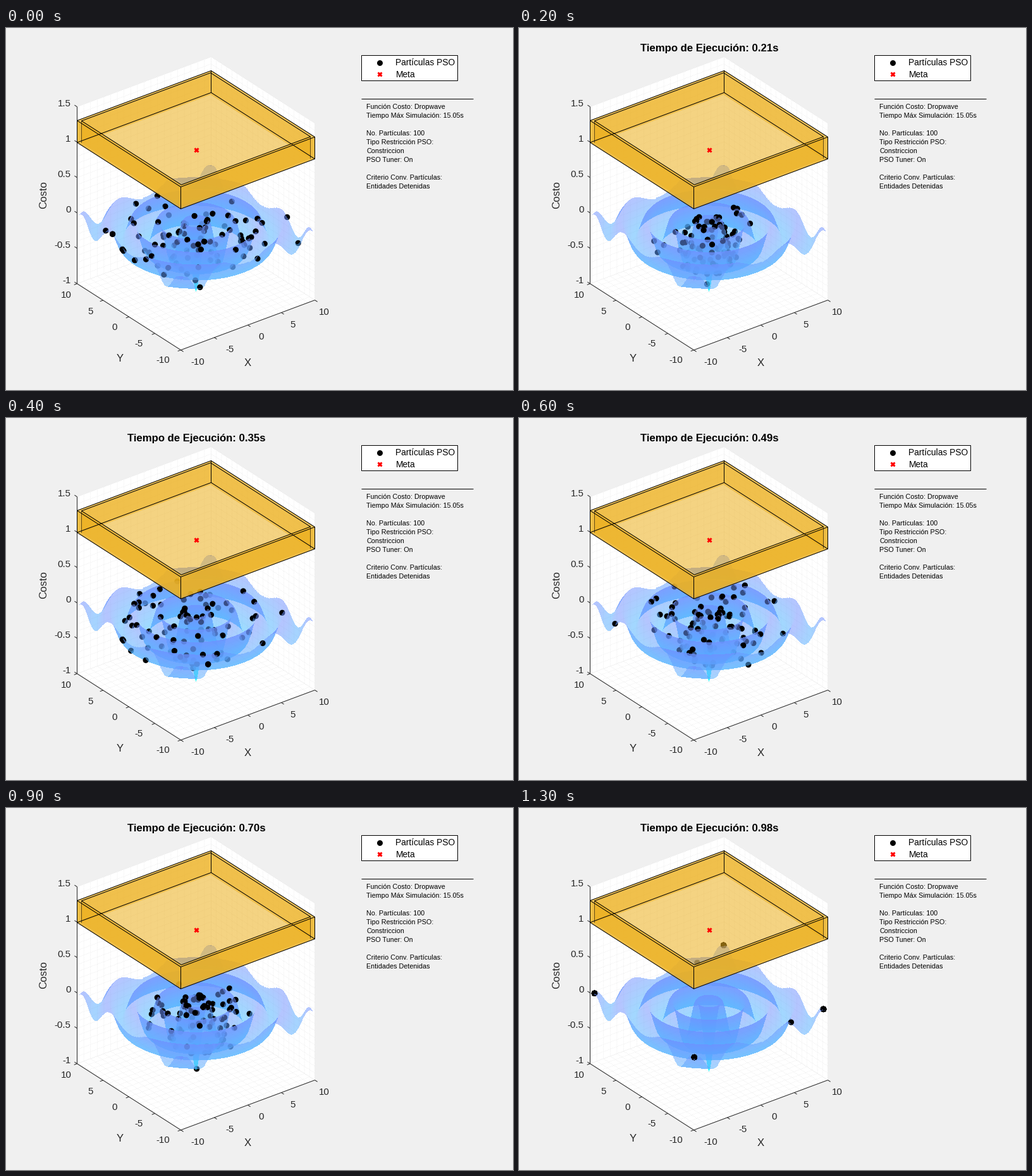
Recreate the animation shown at these times as a matplotlib script. Size 802 px wide and 573 px high, loop 1.4 s.

```python
import numpy as np
import matplotlib.pyplot as plt
from matplotlib.animation import FuncAnimation
from matplotlib.collections import LineCollection
from matplotlib.patches import Polygon, Rectangle

W, H, DPI = 802, 573, 64
PT = 72 / DPI                 # points per pixel
FRAMES, STEP_MS = 14, 100
INK = "#262626"
GOLD = (0.929, 0.694, 0.125)
WALL = 9.63                   # inner side of the box, where particles stop

plt.rcParams["font.family"] = "Liberation Sans"
fig = plt.figure(figsize=(W / DPI, H / DPI), dpi=DPI, facecolor="#f0f0f0")
ax = fig.add_axes([0, 0, 1, 1])
ax.set(xlim=(-0.5, W - 0.5), ylim=(H - 0.5, -0.5))   # whole numbers are pixel centres
ax.axis("off")


def project(x, y, z):
    return np.stack([300 + 10.6 * x - 8.2 * y,
                     305.2 - 3.95 * x - 5.25 * y - 112 * z], axis=-1)


def cost(x, y):
    r = np.hypot(x, y)
    return -(1 + np.cos(2.09 * r)) / (0.5 * r + 2)


def path3(points):
    return project(*np.array(points, float).T)


def label(x, y, text, size, ha="center", **kw):
    return ax.text(x, y + 0.36 * size, text, size=size * PT, ha=ha,
                   va="baseline", **kw)


def segments(lines, color, width=1, **kw):
    ax.add_collection(LineCollection(lines, colors=color, snap=False,
                                     linewidths=width * PT, **kw))


# ---------- axes ----------
def draw_axes():
    hull = [(-10, 10, 1.5), (10, 10, 1.5), (10, -10, 1.5),
            (10, -10, -1), (-10, -10, -1), (-10, 10, -1)]
    ax.add_patch(Polygon(path3(hull), fc="white", ec="none", zorder=0))

    grid = []
    for v in range(-10, 11):
        grid += [path3([(v, -10, -1), (v, 10, -1), (v, 10, 1.5)]),
                 path3([(-10, v, -1), (10, v, -1), (10, v, 1.5)])]
    for z in np.linspace(-1, 1.5, 26):
        grid.append(path3([(-10, 10, z), (10, 10, z), (10, -10, z)]))
    segments(grid, "#d2d2d2", 0.6, linestyles=(0, (1, 3)), zorder=1)

    lines = [path3([(-10, 10, 1.5), (-10, 10, -1), (-10, -10, -1), (10, -10, -1)])]
    for i, v in enumerate(range(-10, 11, 5)):
        lines.append(path3([(v, -10, -1), (v, -10.5, -1)]))
        lines.append(path3([(-10, v, -1), (-10.45, v, -1)]))
        label(303 + 50 * i, 527 - 19.8 * i, str(v), 15, color=INK)
        label(248 - 38.2 * i, 524 - 25.7 * i, str(v), 15, color=INK)
    for i in range(6):
        z = -1 + i / 2
        lines.append(path3([(-10, 10, z), (-10, 10.5, z)]))
        label(102, 398 - 56 * i, f"{z:g}", 15, "right", color=INK)
    segments(lines, INK, zorder=2)
    label(382, 528, "X", 16.7, color=INK)
    label(180, 521, "Y", 16.7, color=INK)
    ax.text(59.5, 264, "Costo", size=16.7 * PT, rotation=90, ha="center",
            va="center", color=INK)


# ---------- box and goal ----------
def draw_box():
    corners = np.array([(-1, 1), (1, 1), (1, -1), (-1, -1)])   # left, back, right, front

    def ring(radius, z):
        return project(*(corners * radius).T, z)

    top, low = ring(10, 1.305), ring(10, 0.995)
    inner_top, inner_low = ring(WALL, 1.305), ring(WALL, 0.995)

    def face(points, alpha):
        ax.add_patch(Polygon(points, fc=(*GOLD, alpha), ec="none", zorder=5))

    face(low, 0.56)
    for i, j in ((0, 1), (1, 2), (3, 0), (2, 3)):
        face([low[i], low[j], top[j], top[i]], 0.6)
        face([inner_low[i], inner_low[j], inner_top[j], inner_top[i]], 0.5)
        face([top[i], top[j], inner_top[j], inner_top[i]], 0.35)

    lines = [np.vstack([loop, loop[:1]]) for loop in (top, inner_top, low)]
    lines += [[a, b] for a, b in zip(low, top)]
    segments(lines, "black", zorder=6)
    segments([[inner_low[i], inner_top[i]] for i in (0, 2)], (0, 0, 0, 0.6), zorder=6)


def cross(x, y):
    ax.plot(x, y, "x", color="red", ms=6.5 * PT, mew=3 * PT, zorder=8)


def draw_panel():
    ax.add_patch(Rectangle((562, 43), 152, 40, fc="white", ec="black",
                           lw=PT, snap=False, zorder=7))
    ax.plot(590, 54, "o", color="black", ms=9 * PT, mew=0, zorder=8)
    cross(590, 72.5)
    label(616, 54, "Partículas PSO", 13.8, "left", zorder=8)
    label(616, 72.5, "Meta", 13.8, "left", zorder=8)
    segments([[(562, 112), (739, 112)]], "black")
    info = ["Función Costo: Dropwave", "Tiempo Máx Simulación: 15.05s", "",
            "No. Partículas: 100", "Tipo Restricción PSO:", "Constriccion",
            "PSO Tuner: On", "", "Criterio Conv. Partículas:",
            "Entidades Detenidas"]
    for i, text in enumerate(info):
        label(570, 124 + 14 * i, text, 10.7, "left")


# ---------- surface: slices from far to near, blended per pixel ----------
LEFT, TOP = 108, 200
COLS, ROWS = np.arange(LEFT, 494), np.arange(TOP, 430)
DEPTHS = np.linspace(-14, 14, 500)
ALPHA = 0.52


def build_slices():
    u, t = (COLS - 300) / 13.4, DEPTHS[:, None]
    x, y = 0.791 * u - 0.612 * t, -0.612 * u - 0.791 * t
    z = cost(x, y)
    height = project(x, y, z)[..., 1]
    inside = np.maximum(abs(x), abs(y)) <= 9.85
    paint = plt.get_cmap("cool")((z + 1) / 2.3) * ALPHA
    paint[..., 3] = ALPHA
    slices = []
    for i in range(len(DEPTHS) - 1):
        low, high = np.sort(height[i:i + 2], axis=0)
        hit = (ROWS[:, None] >= low) & (ROWS[:, None] < high) & inside[i] & inside[i + 1]
        row, col = np.nonzero(hit)
        slices.append((row, col, paint[i, col]))
    return slices


def stamp(image, cx, cy):
    r = slice(int(cy) - TOP - 6, int(cy) - TOP + 8)
    c = slice(int(cx) - LEFT - 6, int(cx) - LEFT + 8)
    distance = np.hypot(COLS[c] - cx, ROWS[r, None] - cy)
    cover = np.clip(5.1 - distance, 0, 1)[..., None]
    image[r, c] = image[r, c] * (1 - cover) + cover * [0, 0, 0, 1]


def render(x, y):
    """Premultiplied surface with the particles between its layers."""
    image = np.zeros((len(ROWS), len(COLS), 4))
    spots = project(x, y, cost(x, y))
    layer = np.searchsorted(DEPTHS, 0.08 - 0.612 * x - 0.791 * y)
    for i, (row, col, paint) in enumerate(slices):
        image[row, col] = image[row, col] * (1 - ALPHA) + paint
        for spot in spots[layer == i]:
            stamp(image, *spot)
    image[..., :3] /= np.maximum(image[..., 3:], 1e-6)
    return np.clip(image, 0, 1)


# ---------- particles ----------
def particles(step):
    """The swarm contracts, spreads again, then is flung against the walls."""
    spread = np.exp(np.interp(step, [0, 1, 4, 9, 11, 13],
                              np.log([4.2, 1.7, 4.2, 2.2, 70, 500])))
    rng = np.random.default_rng(20 + step)
    return np.clip(rng.normal(0, spread, (2, 100)), -WALL, WALL)


slices = build_slices()
draw_axes()
draw_box()
draw_panel()
cross(300, 192)
title = label(300.5, 30, "", 16.7, weight="bold")
scene = ax.imshow(np.zeros((len(ROWS), len(COLS), 4)), aspect="auto",
                  interpolation="nearest", zorder=3,
                  extent=(LEFT - 0.5, COLS[-1] + 0.5, ROWS[-1] + 0.5, TOP - 0.5))
ax.set(xlim=(-0.5, W - 0.5), ylim=(H - 0.5, -0.5))


def update(step):
    scene.set_data(render(*particles(step)))
    title.set_text(f"Tiempo de Ejecución: {0.07 * (step + 1):.2f}s" if step else "")
    return scene, title


anim = FuncAnimation(fig, update, frames=FRAMES, interval=STEP_MS,
                     init_func=lambda: update(0), repeat=True, repeat_delay=0)
plt.show()
```
